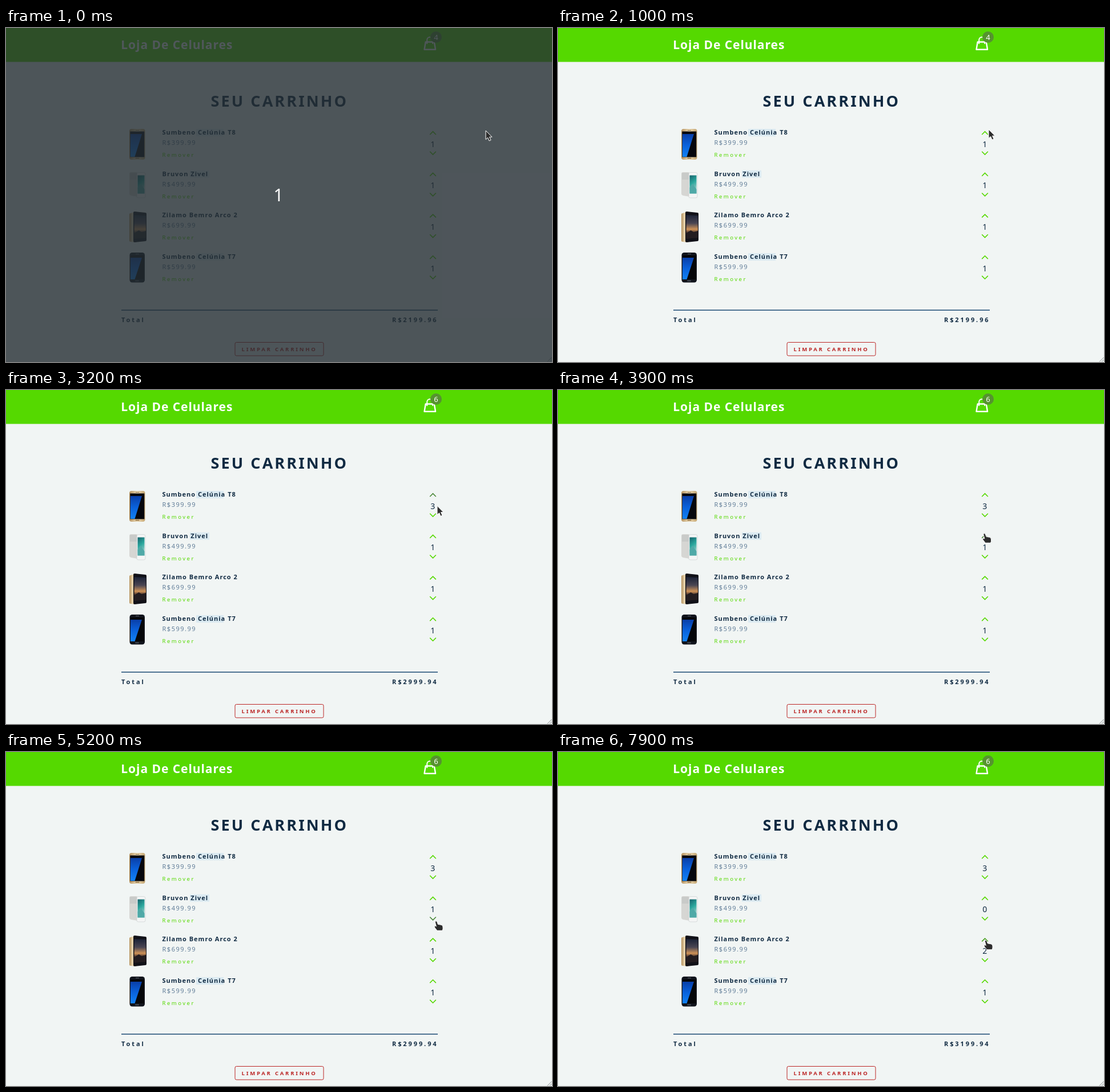
Animation of 956x586 px, one loop 8 s. Source, as an HTML page:

```html
<!DOCTYPE html>
<html lang="pt">
<head>
<meta charset="utf-8">
<title>Seu carrinho</title>
<style>
  html, body { margin: 0; width: 100%; height: 100%; overflow: hidden; background: #f1f5f4; }
  svg { display: block; width: 956px; height: 586px; }
  text { font-family: "Noto Sans", "Open Sans", sans-serif; fill: #102a42; white-space: pre; }
  .brand { font-size: 21px; font-weight: 700; letter-spacing: .95px; fill: #fff; }
  .heading { font-size: 27px; font-weight: 700; letter-spacing: 3.1px; }
  .name { font-size: 11px; font-weight: 600; letter-spacing: 1px; }
  .price { font-size: 11px; font-weight: 500; letter-spacing: 1.5px; fill: #617d98; }
  .remove { font-size: 9.5px; letter-spacing: 2.5px; fill: #55d900; }
  .total { font-size: 11px; font-weight: 700; letter-spacing: 2.9px; }
  .clear { font-size: 9.5px; font-weight: 700; letter-spacing: 2.8px; fill: #bb2525; }
  .qty { font-size: 14px; text-anchor: middle; }
  .badge { font-size: 13px; text-anchor: middle; fill: #fff; }
  .count { font-size: 30px; text-anchor: middle; fill: #fff; }
  .chevron { fill: none; stroke-width: 1.6; }
</style>
</head>
<body>
<svg viewBox="0 0 956 586">
  <defs>
    <linearGradient id="dusk" x2="0" y2="1">
      <stop offset="0" stop-color="#1b2236"/>
      <stop offset=".35" stop-color="#4b4653"/>
      <stop offset=".6" stop-color="#cf9257"/>
      <stop offset=".72" stop-color="#5a4034"/>
      <stop offset="1" stop-color="#17161c"/>
    </linearGradient>
    <linearGradient id="gold">
      <stop offset="0" stop-color="#b6935f"/>
      <stop offset=".5" stop-color="#ecd9b4"/>
      <stop offset="1" stop-color="#c3a470"/>
    </linearGradient>
    <linearGradient id="blue" x2="0" y2="1">
      <stop offset="0" stop-color="#0a3fa8"/>
      <stop offset=".5" stop-color="#0a62dc"/>
      <stop offset="1" stop-color="#1282f4"/>
    </linearGradient>
    <linearGradient id="teal" x2=".3" y2="1">
      <stop offset="0" stop-color="#16636c"/>
      <stop offset=".5" stop-color="#2ba79d"/>
      <stop offset="1" stop-color="#9fcfcb"/>
    </linearGradient>
  </defs>

  <rect width="956" height="586" fill="#f1f5f4"/>
  <rect width="956" height="59.5" fill="#55d900"/>
  <text class="brand" x="201.300" y="37">Loja De Celulares</text>
  <g fill="none" stroke="#fff" stroke-width="2.4" stroke-linejoin="round">
    <path d="M734.7 24.5H749.8L752 37.8H732.5Z"/>
    <path d="M737.2 28V21a5 5 0 0 1 10 0V28" stroke-width="2"/>
  </g>
  <circle cx="753" cy="16" r="10" fill="#56932f"/>
  <text class="badge" id="badge" x="753" y="20.7"></text>

  <text class="heading" x="358.500" y="138">SEU CARRINHO</text>

  <g id="phones">
    <g>
      <rect x="216" y="177" width="27.5" height="54" rx="4" fill="url(#gold)"/>
      <rect x="217.3" y="181.500" width="25" height="45" fill="#06070d"/>
      <path d="M217.8 186H238L225.500 226H217.8Z" fill="url(#blue)"/>
      <rect x="226.5" y="227.500" width="7" height="2" rx="1" fill="#9b7d50"/>
      <path d="M227 179.5h6" stroke="#8b6f47"/>
    </g>
    <g>
      <path d="M216 256q0-3 3-3h8q4 0 4 3v40l-12-2q-3-1-3-3Z" fill="#d6d6d3"/>
      <path d="M217 254h13v12h-13Z" fill="#c9cbc9"/>
      <path d="M229 256q0-2.500 3-2.500h9q3 0 3 3v39q0 2.500-3 2.500h-9q-3 0-3-2Z" fill="#f4f5f5" stroke="#c5c9ca" stroke-width=".6"/>
      <rect x="230.500" y="258.500" width="12" height="32" fill="url(#teal)"/>
      <path d="M230.500 280l5-7 7 10v7.500h-12Z" fill="#4fa9a7"/>
    </g>
    <g>
      <path d="M216 327q0-2 2-2l10-3v54l-10-1q-2 0-2-2Z" fill="url(#gold)"/>
      <path d="M223 324q0-2 2-2l19 2q2 0 2 2v46q0 2-2 2l-19 2q-2 0-2-2Z" fill="#111118"/>
      <path d="M224.500 328l20.500 1v39l-20.500 2Z" fill="url(#dusk)"/>
      <path d="M224.500 360l8-5 5 3 7.500-2v12l-20.500 2Z" fill="#231c20"/>
    </g>
    <g>
      <rect x="216.500" y="394" width="26.500" height="52.500" rx="4.500" fill="#11141c"/>
      <rect x="218" y="399" width="23.500" height="42" fill="#050609"/>
      <path d="M218 403H238L225.500 441H218Z" fill="url(#blue)"/>
      <rect x="226" y="442.500" width="7" height="2" rx="1" fill="#444b55"/>
      <path d="M227 396.500h6" stroke="#596069"/>
    </g>
  </g>
  <g id="rows"></g>

  <rect x="202" y="494" width="554" height="2" fill="#4d7292"/>
  <text class="total" x="202" y="515.500">Total</text>
  <text class="total" id="total" x="676" y="515.500"></text>
  <rect x="401" y="551.500" width="155" height="23.500" rx="2.500" fill="none" stroke="#bb2525"/>
  <text class="clear" x="412.500" y="567">LIMPAR CARRINHO</text>
  <path d="M948 585.500l7.500-7.500M952 585.500l3.500-3.500" stroke="#85898a"/>

  <g id="dimmer">
    <rect width="956" height="586" fill="#252d33" fill-opacity=".8"/>
    <text class="count" x="477" y="304">1</text>
  </g>

  <g id="pointer" fill="#2d2d2d" stroke="#fff" stroke-linejoin="round">
    <path id="arrow" d="M0 0V15.500L3.600 12.300L6 18L9 16.700L6.500 11.200H11Z"/>
    <path id="hand" d="M-1.800 1Q0-1.800 1.800 .8L3.300 5.300 9 6.300Q12 7 12 10V13.500L11 16.300H1.800L-2.500 10.800Q-3.500 8.300-1.500 8L.3 9Z"/>
  </g>
</svg>
<script>
const LOOP = 8000, STEP = 100;
const GREEN = [85, 217, 0], HOVER = [73, 135, 55];
const $ = id => document.getElementById(id);

const products = [
  { name: 'Sumbeno Celúnia T8', price: 399.99, mark: [333, 48] },
  { name: 'Bruvon Zivel', price: 499.99, mark: [322, 34] },
  { name: 'Zilamo Bemro Arco 2', price: 699.99 },
  { name: 'Sumbeno Celúnia T7', price: 599.99, mark: [333, 48] }
];
const ROW_HEIGHT = 72.7;

// Clicks on the chevrons: time, product index, change of quantity.
const clicks = [[2100, 0, 1], [2900, 0, 1], [4100, 1, 1], [5200, 1, -1], [6000, 1, -1], [7900, 2, 1]];

// Time spans in which a chevron is under the pointer.
const hovers = [
  [1100, 3200, 'up0'], [3600, 4500, 'up1'], [4800, 7100, 'down1'], [7700, 9000, 'up2']
];

// Pointer path: time, x, y.
const path = [
  [0, 840, 180], [200, 840, 180], [500, 818, 170], [800, 772, 168], [1100, 745, 183],
  [1500, 751, 184], [2900, 751, 184], [3100, 755, 192], [3400, 755, 226], [3700, 748, 249],
  [3900, 746.5, 252], [4200, 746.5, 252], [4600, 756, 275], [4900, 753, 297],
  [7000, 753, 297], [7100, 751, 303], [7400, 752, 318], [7900, 749, 330.5]
];

$('rows').innerHTML = products.map(({ name, price, mark }, i) => `
  <g transform="translate(0 ${i * ROW_HEIGHT})">
    ${mark ? `<rect x="${mark[0]}" y="177" width="${mark[1]}" height="13" fill="#dbeaf1"/>` : ''}
    <text class="name" x="273.5" y="187">${name}</text>
    <text class="price" x="273.5" y="205">R$${price}</text>
    <text class="remove" x="273.5" y="226">Remover</text>
    <path class="chevron" id="up${i}" d="M742.2 187l5.3-5.3 5.3 5.3"/>
    <text class="qty" id="qty${i}" x="747.3" y="208.8"></text>
    <path class="chevron" id="down${i}" d="M742.2 216.8l5.3 5.3 5.3-5.3"/>
  </g>`).join('');

const clamp = v => Math.max(0, Math.min(1, v));

function pointerAt(t) {
  const next = path.findIndex(key => key[0] > t);
  if (next < 0) return path[path.length - 1].slice(1);
  const [a, b] = [path[next - 1], path[next]];
  const k = (t - a[0]) / (b[0] - a[0]);
  return [1, 2].map(n => a[n] + (b[n] - a[n]) * k);
}

// Hover colour fades in and out over 300 ms.
function chevronColor(id, t) {
  const level = Math.max(0, ...hovers.filter(h => h[2] === id).map(([from, to]) =>
    Math.min(clamp((t - from) / 300), clamp(1 - (t - to) / 300))));
  return `rgb(${GREEN.map((c, n) => Math.round(c + (HOVER[n] - c) * level))})`;
}

function draw(time) {
  const t = Math.floor((time % LOOP) / STEP) * STEP;
  const amounts = products.map((_, i) => clicks.reduce(
    (sum, [at, item, change]) => sum + (item === i && t >= at ? change : 0), 1));

  amounts.forEach((n, i) => {
    $('qty' + i).textContent = n;
    for (const id of ['up' + i, 'down' + i]) $(id).setAttribute('stroke', chevronColor(id, t));
  });
  $('badge').textContent = amounts.reduce((a, b) => a + b);
  $('total').textContent = 'R$' + amounts.reduce((sum, n, i) => sum + n * products[i].price, 0).toFixed(2);

  const hovering = hovers.some(([from, to]) => t >= from && t < to);
  $('arrow').style.display = hovering ? 'none' : '';
  $('hand').style.display = hovering ? '' : 'none';
  $('pointer').setAttribute('transform', `translate(${pointerAt(t)})`);
  $('dimmer').style.display = t < 100 ? '' : 'none';
}

const start = performance.now();
function tick() {
  draw(performance.now() - start);
  requestAnimationFrame(tick);
}
tick();
</script>
</body>
</html>
```
